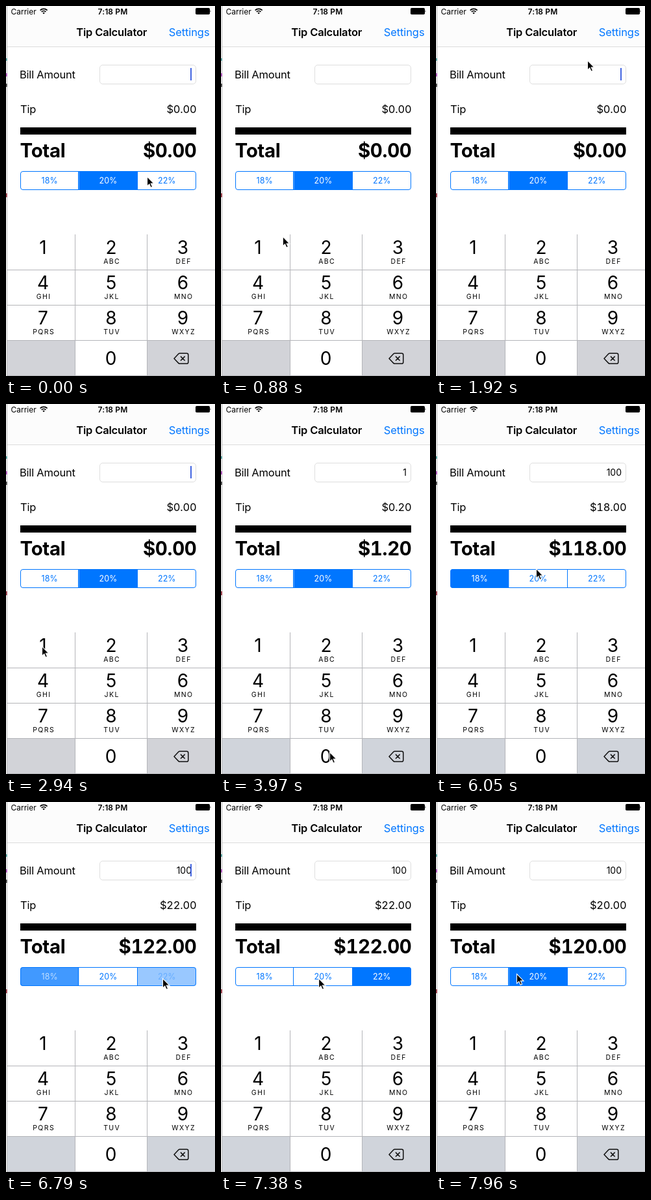
Recreate the animation shown at these times as an HTML page. Size 322x567 px, loop 8000 ms.

```html
<!DOCTYPE html>
<html lang="en">
<head>
<meta charset="utf-8">
<title>Tip Calculator</title>
<style>
  html, body { margin: 0; width: 100%; height: 100%; overflow: hidden; background: #fff; }
  svg { display: block; width: 322px; height: 567px; font-family: Inter, "Liberation Sans", sans-serif; }
  .body { font-size: 16.5px; letter-spacing: -.22px; }
  .end { text-anchor: end; }
  .mid { text-anchor: middle; }
  .big { font-size: 29.5px; font-weight: 700; letter-spacing: -.35px; }
  .sum { font-variant-numeric: tabular-nums; }
  .seg { font-size: 12.5px; }
  .digit { font-size: 28px; }
  .abc { font-size: 10.5px; letter-spacing: 1.4px; }
</style>
</head>
<body>
<svg viewBox="0 0 322 567">
  <defs><clipPath id="round"><rect x="22" y="253" width="271" height="29" rx="4"/></clipPath></defs>
  <rect width="322" height="567" fill="#fff"/>
  <rect x="2" width="320" height="62" fill="#fcfcfc"/>
  <path d="M2 62.5H322" stroke="#dcdcdc"/>
  <path d="M1.5 0V567" stroke="#bcbcbc"/>
  <path d="M0 80h2v4h-2z" fill="#5fa8a5"/>
  <path d="M0 103h2v5h-2z" fill="#b45fc0"/>
  <path d="M0 119h2v5h-2z" fill="#555"/>
  <path d="M0 287h2v6h-2z" fill="#a04a55"/>

  <text x="7.5" y="12.5" font-size="12">Carrier</text>
  <path d="M52.6 6.6a8 8 0 0 1 11 0M54.7 8.9a5 5 0 0 1 6.8 0" fill="none" stroke="#000" stroke-width="1.7"/>
  <path d="M58.1 12.6l-1.7-2a2.6 2.6 0 0 1 3.4 0z"/>
  <text x="164.5" y="12.5" class="mid" font-size="12" font-weight="600" letter-spacing=".15">7:18 PM</text>
  <rect x="292" y="3" width="22" height="10" rx="1.8"/>
  <path d="M314.6 6.3q1.8 1.7 0 3.4z"/>

  <text x="162.7" y="46" class="mid" font-size="16.5" font-weight="600" letter-spacing="-.18">Tip Calculator</text>
  <text x="313.5" y="46" class="body end" style="letter-spacing:-.1px" fill="#0076ff">Settings</text>

  <text x="21" y="110.7" class="body">Bill Amount</text>
  <rect x="144.5" y="90.5" width="148" height="29" rx="4.5" fill="#fff" stroke="#dedede"/>
  <text id="bill" x="286" y="110" class="end" font-size="14"></text>
  <rect id="caret" x="284" y="95" width="2" height="19" fill="#4264e0"/>

  <text x="22" y="163.7" class="body">Tip</text>
  <text id="tip" x="293.5" y="163.7" class="body sum end"></text>
  <rect x="22" y="186" width="271" height="11"/>
  <text x="21.6" y="232" class="big">Total</text>
  <text id="total" x="293.6" y="232" class="big sum end"></text>

  <g id="segments" clip-path="url(#round)"></g>
  <path d="M111.5 253V282M202.5 253V282" stroke="#0076ff"/>
  <rect x="22.5" y="253.5" width="270" height="28" rx="3.5" fill="none" stroke="#0076ff"/>

  <g id="pad"></g>
  <path id="arrow" d="M0 0V14.6L3.3 11.5 5.6 16.8 8.1 15.7 5.8 10.6H10.4Z" stroke="#fff" stroke-width="1.1"/>
</svg>
<script>
const LOOP = 8000, STEP = 147.4;
const $ = id => document.getElementById(id);

function add(parent, tag, attrs, text = '') {
  const el = document.createElementNS('http://www.w3.org/2000/svg', tag);
  for (const name in attrs) el.setAttribute(name, attrs[name]);
  el.textContent = text;
  return parent.appendChild(el);
}

// Number pad
const pad = $('pad');
const sideKeys = [2, 218].map(x =>
  add(pad, 'rect', { x, y: 513, width: 104, height: 54 }));
add(pad, 'path', { d: 'M106.5 350V567M217.5 350V567M2 404.5H322M2 458.5H322M2 512.5H322M2 566.5H322', stroke: '#b4b5b9' });
const centers = [57, 162, 272.5];
['', 'ABC', 'DEF', 'GHI', 'JKL', 'MNO', 'PQRS', 'TUV', 'WXYZ'].forEach((letters, i) => {
  const x = centers[i % 3], y = 380 + 54 * Math.floor(i / 3);
  add(pad, 'text', { x, y, class: 'digit mid' }, i + 1);
  add(pad, 'text', { x: x + 1.2, y: y + 15, class: 'abc mid' }, letters);
});
add(pad, 'text', { x: 161.5, y: 549.7, class: 'digit mid' }, '0');
add(pad, 'path', {
  d: 'M259 540.3L265.8 533Q266.5 532.3 267.5 532.3H278.5Q280.8 532.3 280.8 534.7V545.7Q280.8 548.1 278.5 548.1H267.5Q266.5 548.1 265.8 547.4ZM269 536.9l6.6 6.6M275.6 536.9l-6.6 6.6',
  fill: 'none', stroke: '#111', 'stroke-width': 1.5, 'stroke-linejoin': 'round'
});

// Tip rate selector
const rates = [18, 20, 22];
const width = 271 / 3;
const segments = rates.map((rate, i) => {
  const x = 22 + width * i;
  return {
    fill: add($('segments'), 'rect', { x, y: 253, width, height: 29, fill: '#0076ff' }),
    label: add($('segments'), 'text', { x: x + width / 2, y: 272.3, class: 'seg mid' }, rate + '%')
  };
});

// Pointer stops: arrival time, place, and how long it rests there
const stops = [
  { at: 0, x: 217, y: 261 },
  { at: 1180, x: 72, y: 370 },
  { at: 1920, x: 233, y: 83 },
  { at: 2350, x: 60, y: 368 },
  { at: 2650, x: 20, y: 406 },
  { at: 2940, x: 55, y: 371, rest: 290 },
  { at: 3900, x: 167, y: 533, rest: 820 },
  { at: 5160, x: 103, y: 254, rest: 600 },
  { at: 6050, x: 154, y: 252 },
  { at: 6490, x: 241, y: 270, rest: 400 },
  { at: 7380, x: 150, y: 270, rest: 200 },
  { at: 7960, x: 124, y: 263 }
];
const keyTimes = [3230, 4120, 4420];
const picks = [{ at: -1000, i: 1 }, { at: 5600, i: 0 }, { at: 6780, i: 2 }, { at: 7660, i: 1 }];

const money = v => '$' + v.toFixed(2);
const ease = p => p * p * (3 - 2 * p);

function pointer(t) {
  const next = stops.findIndex(s => s.at > t);
  if (next < 0) return stops[stops.length - 1];
  const a = stops[next - 1], b = stops[next];
  const leave = a.at + (a.rest || 0);
  const p = ease(Math.max(0, (t - leave) / (b.at - leave)));
  return { x: a.x + (b.x - a.x) * p, y: a.y + (b.y - a.y) * p };
}

function draw(time) {
  const t = Math.floor((time + 10) / STEP) * STEP;
  const { x, y } = pointer(t);
  $('arrow').setAttribute('transform', `translate(${x + .5} ${y + .5})`);

  // The caret blinks once a second, starting over at each key
  const keys = keyTimes.filter(at => at <= t + 10);
  const lastKey = keys.length ? keys[keys.length - 1] : -100;
  $('caret').style.display = (t + 10 - lastKey) % 1000 < 500 ? '' : 'none';

  const done = picks.filter(p => p.at <= t);
  const pick = done.pop(), old = done.pop();
  const fade = Math.min(1, .4 + (t - pick.at) / 370);
  segments.forEach(({ fill, label }, i) => {
    const a = i === pick.i ? fade : old && i === old.i ? 1 - fade ** 1.5 : 0;
    fill.setAttribute('opacity', a);
    label.setAttribute('fill', `rgb(${255 * a},${118 + 137 * a},255)`);
  });

  const bill = '100'.slice(0, keys.length);
  const tip = bill * rates[pick.i] / 100;
  $('bill').textContent = bill;
  $('tip').textContent = money(tip);
  $('total').textContent = money(+bill + tip);
  sideKeys.forEach(key => key.setAttribute('fill', keys.length ? '#d0d4db' : '#d2d3d8'));
}

const begin = performance.now();
function tick() {
  draw((performance.now() - begin) % LOOP);
  requestAnimationFrame(tick);
}
tick();
</script>
</body>
</html>
```
